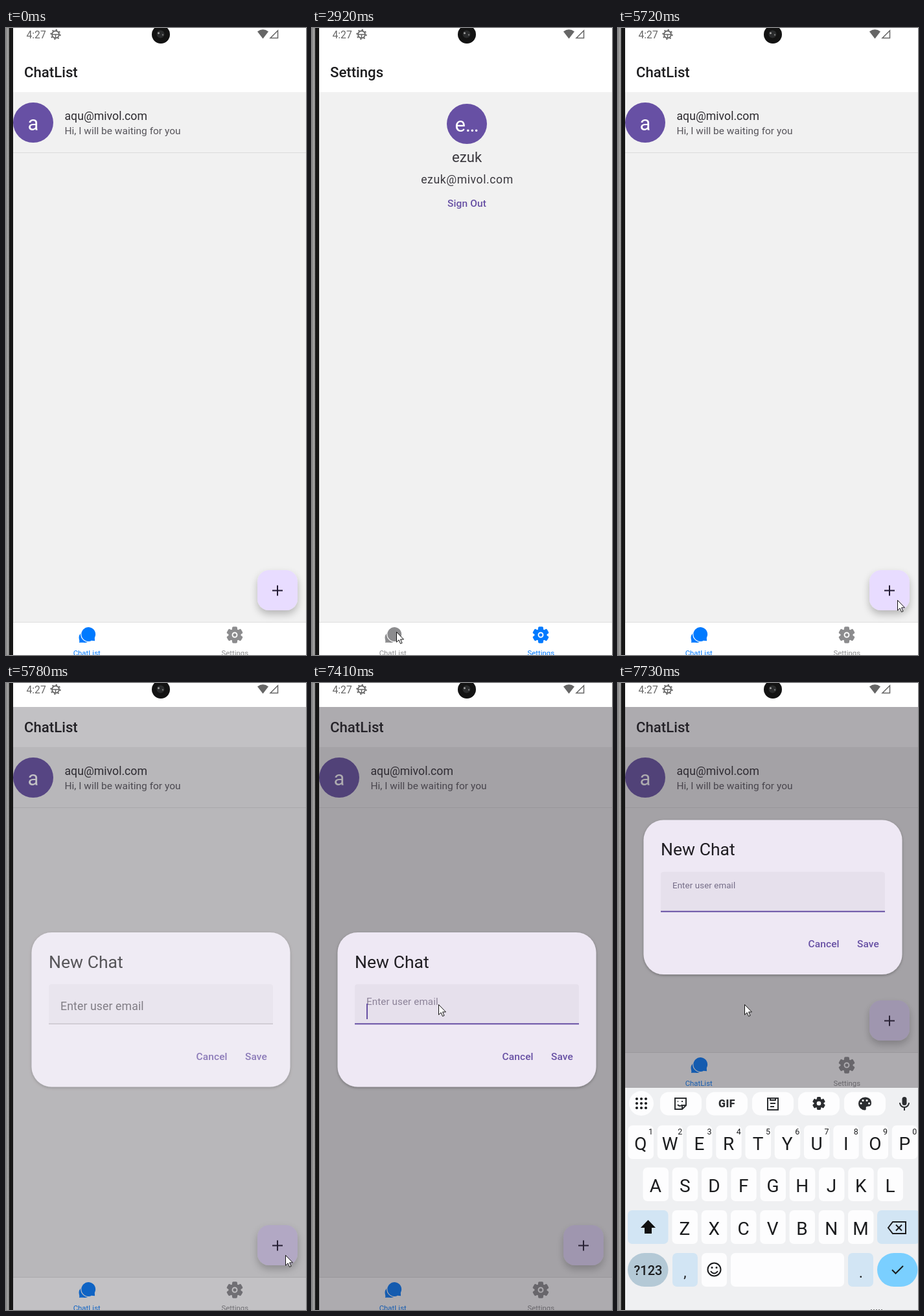
Write an HTML page that moves like this. It is 463 by 968 pixels and loops after 8000 ms.

```html
<!DOCTYPE html>
<html lang="en">
<head>
<meta charset="utf-8">
<title>Chat app</title>
<style>
html, body { margin: 0; width: 100%; height: 100%; overflow: hidden; background: #f1f1f1; }
svg { display: block; font-family: Roboto, sans-serif; }
.mid { text-anchor: middle; }
.med { font-weight: 500; }
.anim { animation: 8s step-end infinite; }

.chat { animation-name: chat; }
.settings { animation-name: settings; }
.tab-chat { animation-name: tabChat; }
.tab-settings { animation-name: tabSettings; }
.foot { animation-name: foot; }
.modal { animation-name: modal; }
.dialog { animation-name: dialog; }
.label { animation-name: label; }
.line { animation-name: line; }
.caret { animation-name: caret; }
.keyboard { animation-name: keyboard; }
.pointer { animation-name: pointer; }
.press { animation-name: press; }

@keyframes chat { 0%, 43.5% { opacity: 1 } 17.125% { opacity: 0 } }
@keyframes settings { 0%, 43.5% { opacity: 0 } 17.125% { opacity: 1 } }
@keyframes tabChat { 0%, 43.5% { color: #007aff } 17.125% { color: #8c8c8e } }
@keyframes tabSettings { 0%, 43.5% { color: #8c8c8e } 17.125% { color: #007aff } }
@keyframes foot { 0% { transform: none } 94.875%, 100% { transform: translateY(-347px) } }
@keyframes dialog { 0% { transform: none } 94.875%, 100% { transform: translateY(-173.5px) } }
@keyframes modal {
  0% { opacity: 0 }
  72.25% { opacity: .74 }
  73% { opacity: .95 }
  73.875%, 100% { opacity: 1 }
}
@keyframes label {
  0% { transform: translate(84px, 505px); fill: #59545f }
  92.625% { transform: translate(84px, 497px) scale(.86); fill: #8c8298 }
  93.375% { transform: translate(84px, 492px) scale(.78); fill: #7f7690 }
  94.125%, 100% { transform: translate(84px, 490.5px) scale(.755); fill: #756d88 }
}
@keyframes line {
  0% { stroke: #bbb5c0; stroke-width: 1.4px }
  92.625%, 100% { stroke: #6750a4; stroke-width: 2px }
}
@keyframes caret { 0%, 94.875%, 100% { opacity: 0 } 90.25% { opacity: 1 } }
@keyframes keyboard {
  0% { transform: translateY(343px) }
  93.375% { transform: translateY(343px); animation-timing-function: steps(5, start) }
  97.44%, 100% { transform: none }
}
@keyframes press {
  0%, 16.375%, 42.875%, 69.25%, 89.375%, 100% { opacity: 0 }
  13.25%, 39.625%, 66.875%, 87% { opacity: .55 }
}
@keyframes pointer {
  0% { transform: translate(387px, 1000px) }
  6.25% { transform: translate(387px, 963px); animation-timing-function: steps(7, start) }
  11.64%, 26.5% { transform: translate(353px, 943px); animation-timing-function: steps(4, start) }
  29.5%, 32% { transform: translate(146px, 905px); animation-timing-function: steps(7, start) }
  37.25%, 49.75% { transform: translate(130px, 932px); animation-timing-function: steps(3, start) }
  52% { transform: translate(107px, 560px); animation-timing-function: steps(2, start) }
  53.5%, 56.625% { transform: translate(124px, 386px); animation-timing-function: steps(2, start) }
  58.125%, 61.375% { transform: translate(413px, 889px); animation-timing-function: steps(5, start) }
  65.28%, 77.75% { transform: translate(431px, 883px); animation-timing-function: steps(3, start) }
  80.06%, 80.125% { transform: translate(226px, 607px); animation-timing-function: steps(6, start) }
  84.625%, 100% { transform: translate(195px, 496px) }
}
</style>
</head>
<body>
<svg width="463" height="968" viewBox="0 0 463 968">
  <defs>
    <linearGradient id="bezel">
      <stop offset="0" stop-color="#858585"/><stop offset=".3" stop-color="#a8a8a8"/>
      <stop offset=".42" stop-color="#6d6d6d"/><stop offset=".47" stop-color="#161616"/>
      <stop offset="1" stop-color="#161616"/>
    </linearGradient>
    <filter id="lift" x="-30%" y="-30%" width="160%" height="170%">
      <feDropShadow dx="0" dy="6" stdDeviation="6" flood-opacity=".24"/>
    </filter>
    <filter id="soft" x="-5%" y="-5%" width="110%" height="112%">
      <feDropShadow dx="0" dy="1.5" stdDeviation="2" flood-opacity=".3"/>
    </filter>
    <g id="cog">
      <circle r="9.6"/>
      <rect id="tooth" x="-4" y="-12.7" width="8" height="25.4" rx="2"/>
      <use href="#tooth" transform="rotate(60)"/>
      <use href="#tooth" transform="rotate(120)"/>
    </g>
  </defs>

  <rect width="463" height="968" fill="#f1f1f1"/>
  <rect width="463" height="99" fill="#fff"/>

  <g class="anim chat">
    <text class="med" x="28" y="76.300" font-size="22.200" fill="#1c1c1e">ChatList</text>
    <circle cx="42" cy="146" r="31" fill="#6750a4"/>
    <text class="mid" x="42" y="158" font-size="31" fill="#fff">a</text>
    <text x="90.500" y="142" font-size="17.700" fill="#2d2b30">aqu@mivol.com</text>
    <text x="90.500" y="164" font-size="15.500" fill="#57555b">Hi, I will be waiting for you</text>
    <path d="M11 192.500H463" stroke="#dcdcdc"/>
  </g>

  <g class="anim settings">
    <text class="med" x="28" y="76.300" font-size="22.200" fill="#1c1c1e">Settings</text>
    <circle cx="239" cy="148" r="31" fill="#6750a4"/>
    <text class="mid" x="239" y="160" font-size="31" fill="#fff">e…</text>
    <text class="mid" x="239" y="207" font-size="22.200" fill="#3b393f">ezuk</text>
    <text class="mid" x="239.500" y="239.500" font-size="17.700" letter-spacing=".55" fill="#3b393f">ezuk@mivol.com</text>
    <text class="mid med" x="239" y="275.700" font-size="15.500" letter-spacing=".1" fill="#6750a4">Sign Out</text>
  </g>

  <g class="anim foot">
    <g class="anim chat">
      <rect x="388" y="837" width="62" height="62" rx="18" fill="#e8dcff" filter="url(#lift)"/>
      <path d="M411 868.500h16M419 860.500v16" stroke="#221a33" stroke-width="2"/>
    </g>
    <rect x="11" y="917" width="452" height="56" fill="#fff"/>
    <path d="M11 917.500H463" stroke="#dfdfdf"/>
    <g class="anim tab-chat" fill="currentColor">
      <path d="M113 949c1-3-.5-5-.5-8a9 9 0 0 1 18 0c0 5-4 8-9 8-2.500 0-5-.5-8.500 0Z"/>
      <path d="M137.500 947c-2-.5-4-.5-5-.8a11.500 11.500 0 1 1 5-5c-.3 2 .5 4 0 5.800Z" stroke="#fff" stroke-width="1.200"/>
      <text class="mid" x="124.700" y="968.600" font-size="11.400">ChatList</text>
    </g>
    <g class="anim tab-settings" fill="currentColor">
      <use href="#cog" x="353" y="937"/>
      <circle cx="353" cy="937" r="3.500" fill="none" stroke="#fff" stroke-width="1.900"/>
      <text class="mid" x="353.300" y="968.600" font-size="11.400">Settings</text>
    </g>
  </g>

  <g class="anim modal">
    <rect x="11" y="37" width="452" height="931" fill="#322f37" fill-opacity=".4"/>
    <g class="anim dialog">
      <rect x="39.500" y="385" width="399" height="238.500" rx="31" fill="#eee8f4" filter="url(#soft)"/>
      <text x="66" y="439.700" font-size="26.600" fill="#1f1d22">New Chat</text>
      <path d="M66 527V469.500q0-4.500 4.500-4.500H407.500q4.500 0 4.500 4.500V527Z" fill="#e6e0ec"/>
      <path class="anim line" d="M66 526.300H412"/>
      <text class="anim label" font-size="17.700" letter-spacing=".1">Enter user email</text>
      <path class="anim caret" d="M85 495v24" stroke="#6750a4" stroke-width="2"/>
      <g class="med" font-size="15.500" letter-spacing=".1" fill="#6750a4">
        <text x="293.500" y="581.700">Cancel</text>
        <text x="369" y="581.700">Save</text>
      </g>
    </g>
  </g>

  <g class="anim keyboard">
    <rect x="11" y="625" width="452" height="345" fill="#eff0f2"/>
    <g id="keys" fill="#1b1c1e"></g>
    <g fill="none" stroke="#2b2d30" stroke-width="2">
      <path d="M88 641h17v11l-6 6H88ZM99 658v-6h6M92 651q4 4 7 0M92 646h1M98 646h2"/>
      <path d="M231 641h16v18h-16ZM235 641h8v3h-8ZM235 649h8M235 654h6"/>
    </g>
    <text class="mid" x="168" y="655" font-size="16" font-weight="800" letter-spacing=".5" fill="#2b2d30">GIF</text>
    <use href="#cog" transform="translate(310 649) scale(.78)" fill="#2b2d30"/>
    <circle cx="310" cy="649" r="3.300" fill="#fff"/>
    <path d="M381 639.500a10 10 0 1 0 0 20c3 0 1-4 2-5 2-2 8 1 8-6s-5-9-10-9Z" fill="#2b2d30"/>
    <path d="M375 649h.1M378 644.500h.1M384 644.500h.1M387.500 649h.1" stroke="#fff" stroke-width="3" stroke-linecap="round"/>
    <rect x="438.500" y="639" width="7" height="13" rx="3.500" fill="#2b2d30"/>
    <path d="M435 648a7 7 0 0 0 14 0M442 655v5" fill="none" stroke="#2b2d30" stroke-width="2"/>
    <path d="M46.500 829L58 841H52v9H41v-9H35Z" fill="#111"/>
    <g fill="none" stroke="#1b1c1e" stroke-width="2">
      <path d="M417 841l7-9h20v18h-20ZM429 836.500l9 9M438 836.500l-9 9"/>
      <circle cx="148.500" cy="905.500" r="10"/>
      <path d="M143 908q5.500 7 11 0"/>
      <path d="M423 906l5.500 5.500L440 900"/>
    </g>
    <path d="M145 902.500h.1M152 902.500h.1" stroke="#1b1c1e" stroke-width="3" stroke-linecap="round"/>
    <path d="M390 967.500h18" stroke="#777" stroke-dasharray="2 2"/>
  </g>

  <g fill="#666">
    <text x="31.500" y="16" font-size="15.700">4:27</text>
    <g fill="none" stroke="#666">
      <circle cx="76.500" cy="10" r="5.500" stroke-width="1.800"/>
      <circle cx="76.500" cy="10" r="7.200" stroke-width="2" stroke-dasharray="2.200 3.450"/>
      <path d="M71 10h11M76.500 10v5" stroke-width="1.500"/>
      <path d="M408 15.500H419.500V4Z" stroke-width="1.500"/>
    </g>
    <path d="M388 5.500q8.500-6.500 17 0L396.500 16.500Z"/>
  </g>
  <circle cx="239" cy="10" r="14" fill="#131313"/>
  <circle cx="238.500" cy="9.500" r="6" fill="#2a2b2c"/>
  <circle cx="235.500" cy="8" r="1.400" fill="#aaa"/>
  <circle cx="242" cy="10.500" r="1.200" fill="#777"/>
  <rect width="11" height="968" fill="url(#bezel)"/>

  <g class="anim pointer">
    <circle class="anim press" r="15" fill="#e8e000"/>
    <path d="M.5 .5V16.200l3.600-3.400 2.500 5.700 2.500-1.100-2.500-5.500h4.900Z" fill="#fff" stroke="#111"/>
  </g>
</svg>

<script>
const keys = document.getElementById('keys');
const PITCH = 45.25, WHITE = '#fdfdfe', BLUE = '#d2e5f4';

function add(tag, attrs, text = '') {
  const el = document.createElementNS('http://www.w3.org/2000/svg', tag);
  for (const name in attrs) el.setAttribute(name, attrs[name]);
  el.textContent = text;
  keys.append(el);
}

function key(x, y, width, fill = WHITE, rx = 7, height = 52) {
  add('rect', { x, y, width, height, rx, fill });
}

function glyph(text, x, y, size, weight = 400) {
  add('text', { x, y, 'font-size': size, 'font-weight': weight, class: 'mid' }, text);
}

function row(letters, x, y, digits) {
  [...letters].forEach((letter, i) => {
    const cx = x + i * PITCH;
    key(cx - 19.5, y, 39.5);
    glyph(letter, cx, y + 38, 28);
    if (digits) glyph((i + 1) % 10, cx + 15.5, y + 14, 12.5);
  });
}

key(17, 630, 38, WHITE, 19, 38);
for (let i = 0; i < 9; i++) {
  add('circle', { cx: 29 + i % 3 * 7, cy: 642 + Math.floor(i / 3) * 7, r: 2.1 });
}
for (let i = 0; i < 5; i++) key(65 + i * 71, 631.5, 64, WHITE, 13, 36);

row('QWERTYUIOP', 35, 683, true);
row('ASDFGHJKL', 58, 748);
row('ZXCVBNM', 103, 814);
key(15, 814, 62.5, BLUE);
key(400, 814, 66, BLUE);

key(15, 880, 62.5, '#b4c9d6', 26);
key(84, 880, 39, BLUE);
key(129, 880, 39);
key(174, 880, 175);
key(355, 880, 39, BLUE);
key(400, 880, 62.5, '#7acfff', 26);
glyph('?123', 46.5, 913.5, 20, 500);
glyph(',', 103.5, 917, 22);
glyph('.', 375, 918, 24);
</script>
</body>
</html>
```
